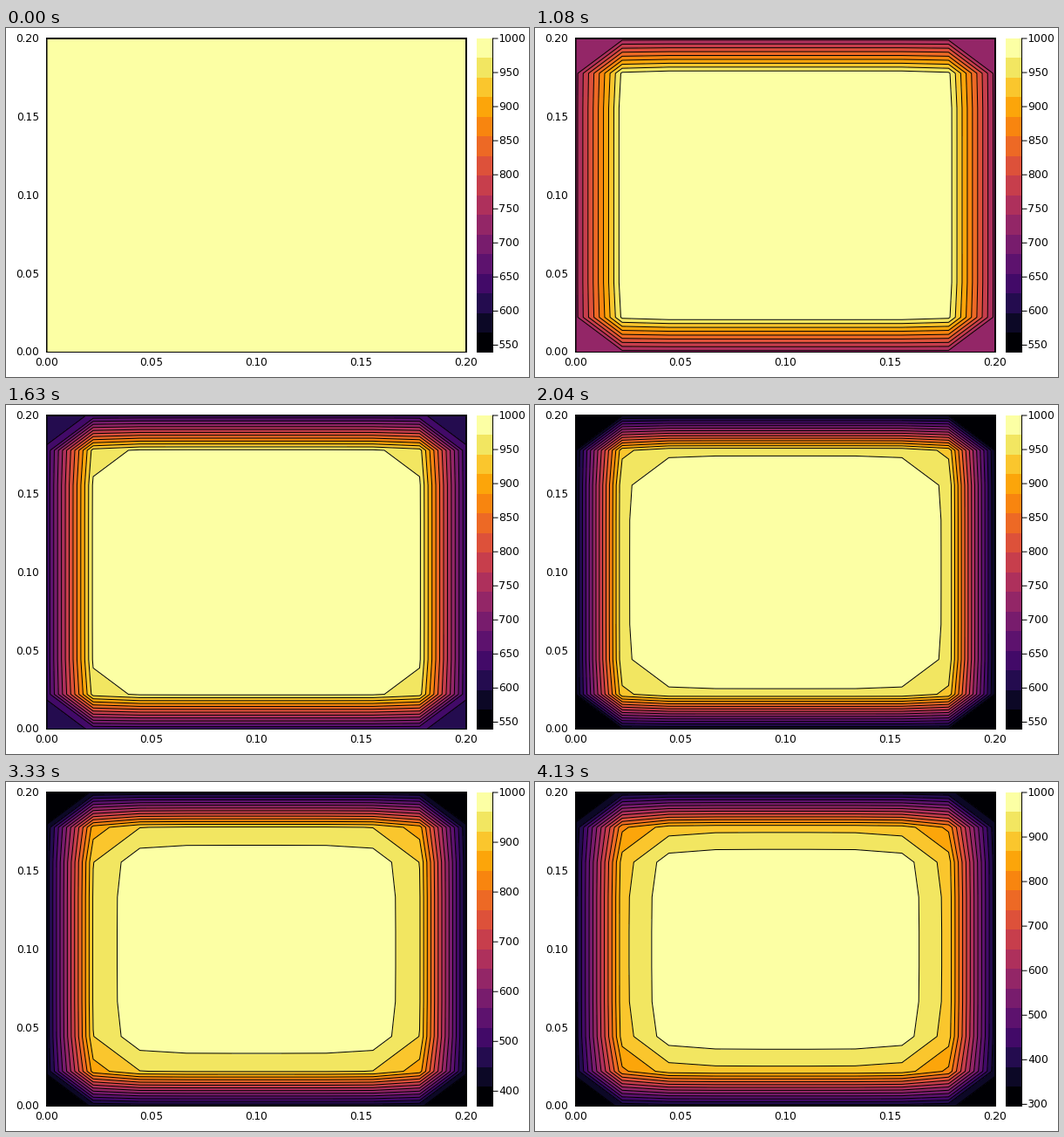
A matplotlib script that plays this animation: 600x400 px, repeating every 4180 ms.

```python
import numpy as np
import matplotlib.pyplot as plt
from matplotlib.animation import FuncAnimation
from matplotlib.patches import Rectangle

PX = 0.72                  # points per pixel at 100 dpi
FPS, STEPS = 24, 100
TICK_MS, TICKS = 20, 209   # one loop is 4180 ms

N = 10                     # grid nodes per side
T0 = 1000.0
DIFFUSION, LOSS = 0.0032, 0.0126
BANDS = 16

LEFT, RIGHT, TOP, BOTTOM = 46.5, 528, 12, 371.5
BAR_L, BAR_R = 540, 558

# whole-pixel glyph advances
plt.rcParams.update({"font.family": "DejaVu Sans", "text.hinting_factor": 1})


def cool():
    """Plate that conducts inside and loses heat along its rim."""
    rim = np.ones((N, N))
    rim[1:-1, 1:-1] = 0
    temp = np.full((N, N), T0)
    history = [temp]
    for _ in range(STEPS - 1):
        p = np.pad(temp, 1, mode="edge")
        lap = p[2:, 1:-1] + p[:-2, 1:-1] + p[1:-1, 2:] + p[1:-1, :-2] - 4 * temp
        temp = temp + DIFFUSION * lap - LOSS * rim * temp
        history.append(temp)
    return history


fields = cool()
floor = fields[49].min()
colors = plt.get_cmap("inferno")(np.linspace(0, 1, BANDS))
xs = np.linspace(LEFT, RIGHT, N)
ys = np.linspace(BOTTOM, TOP, N)

fig = plt.figure(figsize=(6, 4), dpi=100, facecolor="white")
ax = fig.add_axes([0, 0, 1, 1])
ax.axis("off")


def label(x, y, text, ha):
    return ax.text(x, y + 3.9, text, ha=ha, va="baseline",
                   fontsize=12 * PX, color="black", zorder=6)


def line(x, y, width=1):
    return ax.plot(x, y, color="black", lw=width * PX, zorder=5,
                   solid_capstyle="butt", snap=False)[0]


for i in range(5):
    name = f"{0.05 * i:.2f}"
    label(LEFT + (RIGHT - LEFT) * i / 4, 383.3, name, "center")
    label(38, BOTTOM + (TOP - BOTTOM) * i / 4, name, "right")

line([LEFT + 0.25] * 2, [TOP - 1, BOTTOM + 0.5], 1.5)
line([RIGHT] * 2, [TOP - 1, BOTTOM + 0.5], 2)
line([LEFT, RIGHT], [TOP] * 2, 2)
line([LEFT, RIGHT], [BOTTOM] * 2)

band_h = (BOTTOM - TOP) / BANDS
for i, color in enumerate(colors):
    ax.add_patch(Rectangle((BAR_L, BOTTOM - (i + 1) * band_h),
                           BAR_R - BAR_L, band_h, fc=color, lw=0,
                           antialiased=False))
line([BAR_R + 0.5] * 2, [TOP - 0.5, BOTTOM + 0.5])

shown = []


def draw(n):
    while shown:
        shown.pop().remove()
    k = min(STEPS - 1, int((n * TICK_MS + 15) * FPS / 1000))
    temp = fields[k]
    low = min(floor, temp.min())
    levels = np.linspace(low, T0, BANDS + 1)[1:-1]

    shown.append(ax.contourf(xs, ys, temp, levels=levels, colors=colors,
                             extend="both", zorder=1))
    if temp.min() < levels[-1]:
        shown.append(ax.contour(xs, ys, temp, levels=levels, colors="black",
                                linewidths=PX, zorder=2))

    step = 50 if low > 500 else 100
    for value in range(int(np.ceil(low / step)) * step, int(T0) + 1, step):
        y = BOTTOM - (value - low) / (T0 - low) * (BOTTOM - TOP)
        shown.append(line([BAR_R + 0.5, BAR_R + 6.5], [y, y]))
        shown.append(label(565, y, str(value), "left"))

    ax.set_xlim(0, 600)
    ax.set_ylim(400, 0)
    return []


anim = FuncAnimation(fig, draw, frames=TICKS, interval=TICK_MS,
                     repeat=True, repeat_delay=0, blit=False)
plt.show()
```
